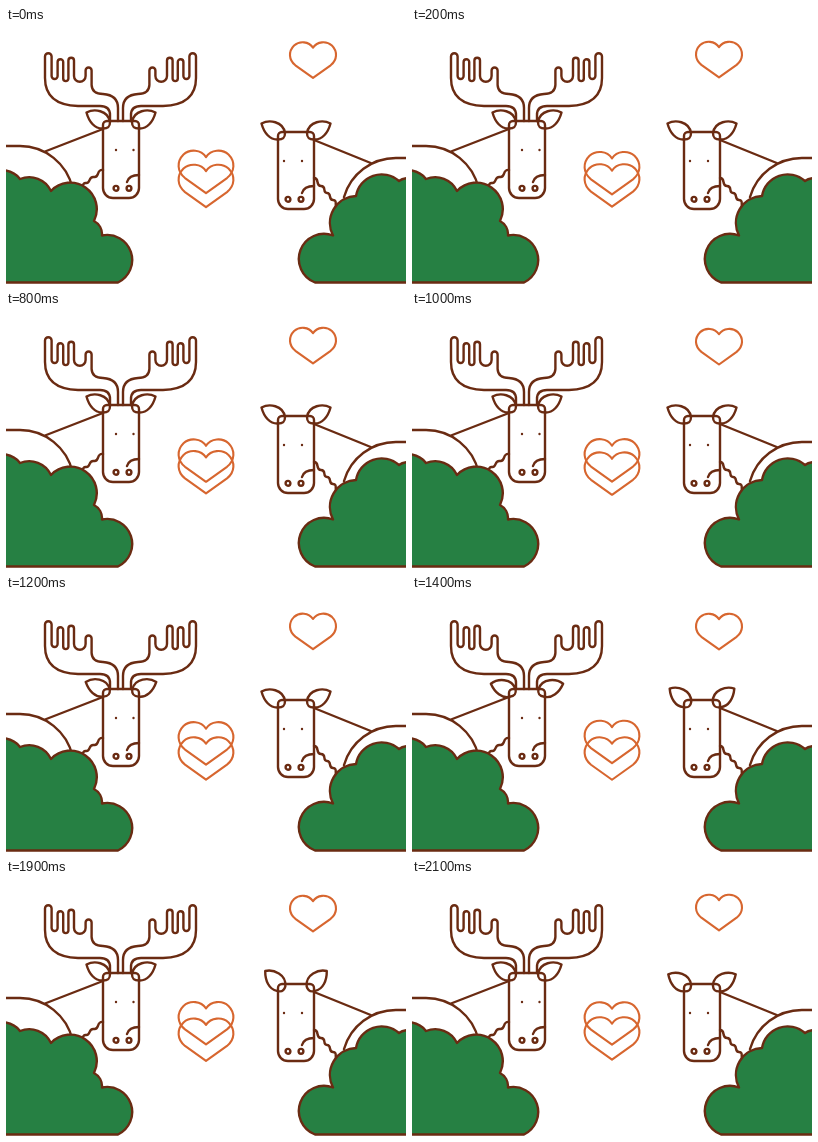
Write an HTML page with a canvas that moves like this. It is 400 by 256 pixels and loops after 3100 ms.

```html
<!DOCTYPE html>
<html lang="en">
<head>
<meta charset="utf-8">
<title>Two moose</title>
<style>
html, body { margin: 0; width: 100%; height: 100%; overflow: hidden; background: #fff; }
canvas { display: block; }
</style>
</head>
<body>
<canvas id="stage" width="400" height="256"></canvas>
<script>
const ctx = document.getElementById('stage').getContext('2d');
const BROWN = '#6a2b12', GREEN = '#268043', ORANGE = '#d7662f';
const LOOP = 3100, STEP = 100, LAST = 21, CYCLE = 2200;

const antler = new Path2D(
  'M104 93V87Q104 78 94 78H72Q39 77 39 50V28.5a3.3 3.3 0 0 1 6.6 0V48a3 3 0 0 0 6 0' +
  'V34a2.8 2.8 0 0 1 5.6 0V50.500a2.6 2.6 0 0 0 5.2 0V32.500a2.8 2.8 0 0 1 5.6 0V48' +
  'a5.8 5.8 0 0 0 11.6 0V42.5a3 3 0 0 1 6 0V57Q86 66 97 66Q112 67 112 80V93');
const ear = new Path2D('M-18.500-11.500C-11-15.500 3-14 5-2C5 3 3 4.500-2 4.500C-10 5-16-2-18.500-11.500Z');
const cheek = new Path2D('M36 54Q26 54 24 61');
const heart = new Path2D(
  'M0 6.500C-5-1-16-2-22.500 4C-29.500 11-29 21-21 27.500L0 42.500' +
  'L21 27.500C29 21 29.500 11 22.500 4C16-2 5-1 0 6.500Z');

const maleBody = new Path2D(
  'M0 118H14A54 54 0 0 1 66.500 160M39 123.500L97 101' +
  'M97 142C90 141 94 150 88 149S85 156 80 155S78 163 72 161');
const femaleBody = new Path2D(
  'M400 130H390A54 54 0 0 0 338 169M308 112L366 135.500' +
  'M308 150C314 150 309 158 315 158S316 165 321 165S322 172 327 172S328 178 331 179');

const leftBush = new Path2D(
  'M-4 142Q8 143 14 151A24 24 0 0 1 45 163A26.500 26.500 0 0 1 88 193' +
  'A15 15 0 0 1 96 207.500A25 25 0 0 1 112 254.500H-4Z');
const rightBush = new Path2D(
  'M404 150Q397 150 393 153A26 26 0 0 0 350 168A27 27 0 0 0 327 207.500' +
  'A25 25 0 0 0 309 254.500H404Z');

function at(x, y, draw, sx = 1, sy = sx, turn = 0) {
  ctx.save();
  ctx.translate(x, y);
  ctx.scale(sx, sy);
  ctx.rotate(turn);
  draw();
  ctx.restore();
}

function dot(x, y, r, fill) {
  ctx.beginPath();
  ctx.arc(x, y, r, 0, 7);
  fill ? ctx.fill() : ctx.stroke();
}

function drawHead(eyes, nostrils, earTurn, open) {
  ctx.beginPath();
  ctx.roundRect(0, 0, 36, 77, [4, 4, 10, 10]);
  ctx.stroke();
  at(2, 3, () => ctx.stroke(ear), 1, 1, earTurn);
  at(34, 3, () => ctx.stroke(ear), -1, 1, earTurn);
  ctx.stroke(cheek);
  for (const x of nostrils) dot(x, 67.3, 2.4);
  if (open) for (const x of eyes) dot(x, 29, 1.2, true);
}

function drawBush(path) {
  ctx.fillStyle = GREEN;
  ctx.fill(path);
  ctx.stroke(path);
}

// Smooth bob from 0 to size and back, smallest at the start time
const bob = (t, start, size) => size * (1 - Math.cos(2 * Math.PI * (t - start) / CYCLE)) / 2;

// Half sine wave between two times, zero outside
const pulse = (t, from, to) => t > from && t < to ? Math.sin(Math.PI * (t - from) / (to - from)) : 0;

function drawHeart(x, y, scale) {
  ctx.lineWidth = 2.1;
  at(x, y, () => { ctx.lineWidth /= scale; ctx.stroke(heart); }, scale);
}

function render(t) {
  ctx.fillStyle = '#fff';
  ctx.fillRect(0, 0, 400, 256);
  ctx.lineCap = ctx.lineJoin = 'round';

  ctx.strokeStyle = ORANGE;
  drawHeart(200, 121.9 + bob(t, -250, 5.4), 1);
  drawHeart(200, 136.1 + bob(t, 220, 5.2), 1);
  drawHeart(307, 13.7 + bob(t, 250, 4), 0.84);

  ctx.strokeStyle = ctx.fillStyle = BROWN;
  ctx.lineWidth = 2.4;
  ctx.stroke(maleBody);
  ctx.stroke(femaleBody);
  ctx.stroke(antler);
  at(229, 0, () => ctx.stroke(antler), -1, 1);

  const blink = t >= 500 && t < 700;
  const droop = -0.17 * pulse(t, 1100, 1800);
  const lift = 0.37 * pulse(t, 1200, 2200) ** 1.5;
  at(97, 93, () => drawHead([13, 30.5], [13, 26], droop, !blink));
  at(272, 104, () => drawHead([6, 24], [10, 23], lift, true));

  drawBush(leftBush);
  drawBush(rightBush);
}

function frame(now) {
  const step = Math.min(LAST, Math.floor(now % LOOP / STEP));
  render(step * STEP);
  requestAnimationFrame(frame);
}
requestAnimationFrame(frame);
</script>
</body>
</html>
```
